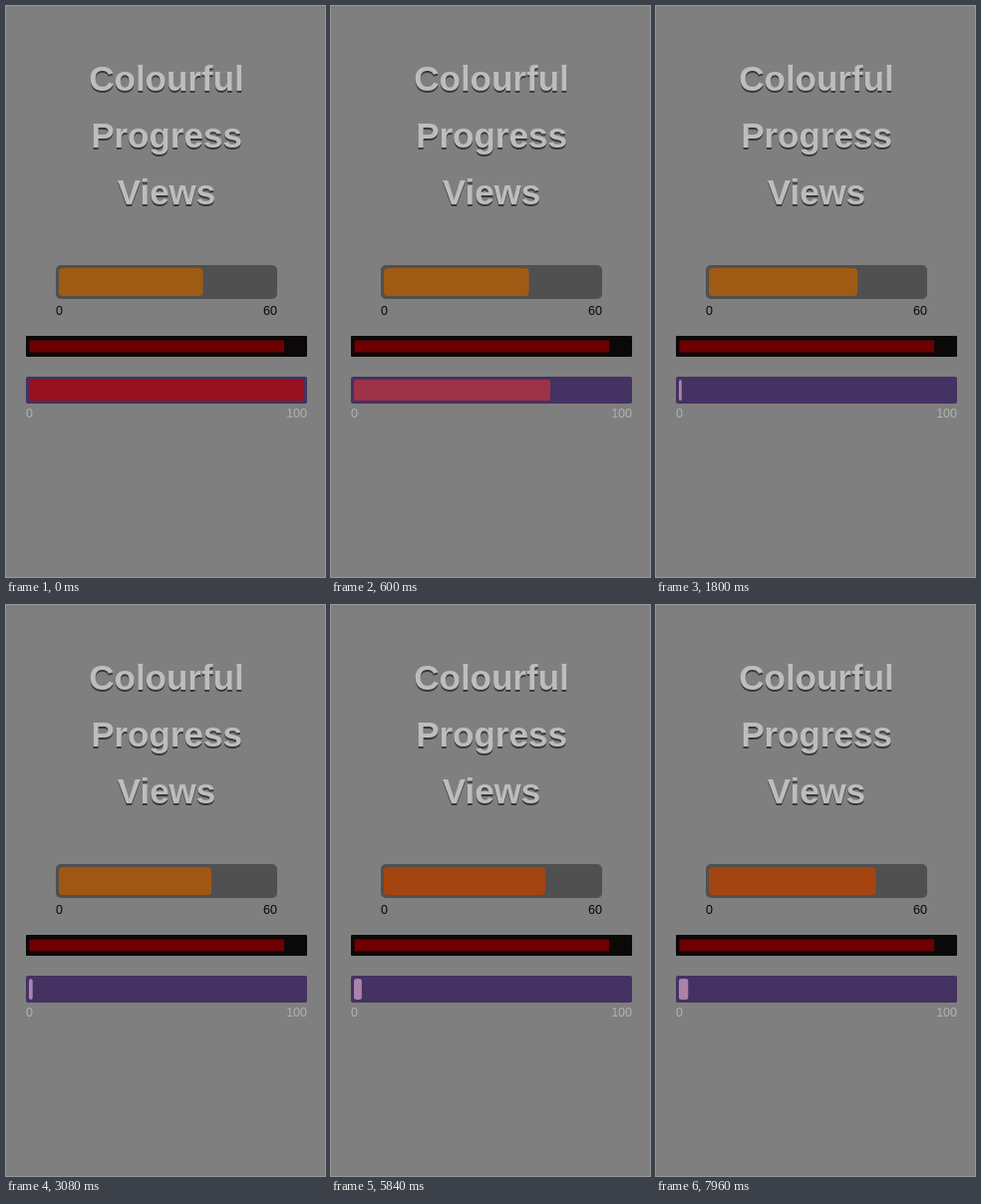
These frames come from a looping animation (320 px wide and 573 px high, 8000 ms). An HTML page:

```html
<!DOCTYPE html>
<html lang="en">
<head>
<meta charset="utf-8">
<title>Colourful Progress Views</title>
<style>
  html, body { margin: 0; width: 100%; height: 100%; overflow: hidden; background: #7f7f7f; }
  svg { display: block; width: 320px; height: 573px; font: 12.5px "Liberation Sans", Arial, sans-serif; }
  .title { font-size: 35px; font-weight: bold; text-anchor: middle; }
  .end { text-anchor: end; }
</style>
</head>
<body>
<svg viewBox="0 0 320 573">
  <defs>
    <g id="title" class="title">
      <text x="161" y="85">Colourful</text>
      <text x="161" y="142">Progress</text>
      <text x="161" y="199">Views</text>
    </g>
  </defs>
  <use href="#title" y="1.6" fill="#383838"/>
  <use href="#title" fill="#bdbdbd"/>

  <rect x="50" y="260" width="222" height="34" rx="5" fill="#505050"/>
  <rect id="orange" x="53" y="263" height="28" rx="4"/>
  <g fill="#080808">
    <text x="50" y="309.5">0</text>
    <text x="272" y="309.5" class="end">60</text>
  </g>

  <rect x="20" y="331" width="282" height="21" rx="1" fill="#0b0908"/>
  <rect x="23.5" y="335.5" width="255.5" height="12" rx="1" fill="#6e0003"/>

  <rect x="20" y="372" width="282" height="27" rx="2" fill="#443262"/>
  <rect id="pink" x="23" y="375" height="21" rx="2.5"/>
  <g fill="#b2b2b2">
    <text x="20" y="413">0</text>
    <text x="302" y="413" class="end">100</text>
  </g>
</svg>
<script>
const LOOP = 8000, FIRST = 260, PERIOD = 1218, DURATION = 960;
const orange = document.getElementById('orange');
const pink = document.getElementById('pink');

const clamp = x => Math.min(1, Math.max(0, x));
const smooth = x => x * x * (3 - 2 * x);
const mix = (from, to, k) => `rgb(${from.map((v, i) => Math.round(v + (to[i] - v) * k))})`;

function setBar(bar, width, color) {
  bar.setAttribute('width', width);
  bar.setAttribute('fill', color);
}

function draw(now) {
  const t = now % LOOP;
  const step = n => smooth(clamp((t - FIRST - n * PERIOD) / DURATION));

  // The upper bar gains one unit per tick, the lower one on every other tick.
  let ticks = 0;
  for (let n = 0; n < 7; n++) ticks += step(n);
  const percent = 100 - 99 * step(0) + step(2) + step(4) + step(6);

  setBar(orange, 144.6 + 3.6 * ticks,
    mix([159, 90, 20], [164, 68, 17], clamp((ticks - 2) / 2.7)));
  setBar(pink, 2.76 * percent,
    mix([170, 135, 174], [153, 16, 31], percent / 100));
  requestAnimationFrame(draw);
}
draw(0);
</script>
</body>
</html>
```
